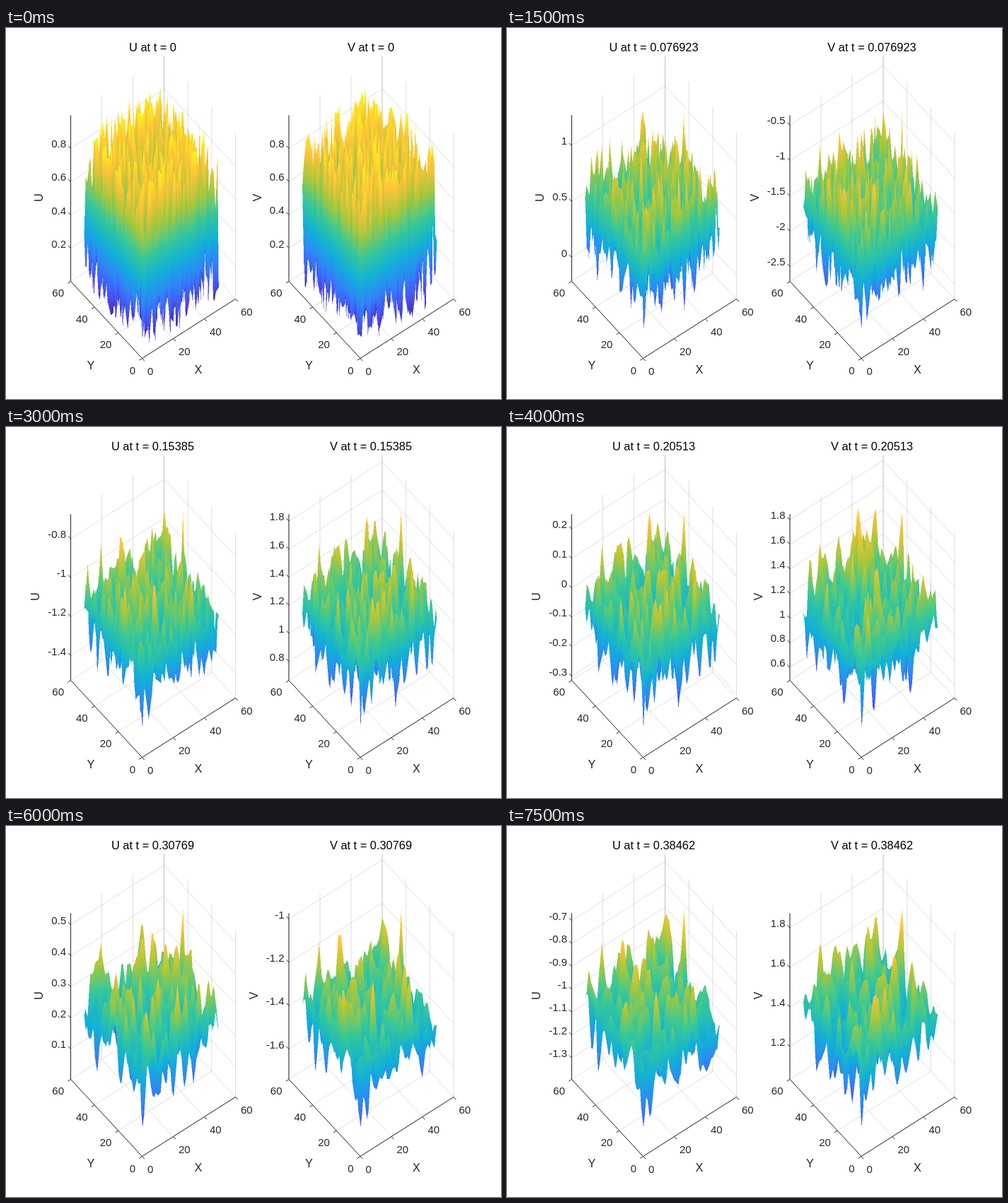
Animation, 700 px wide and 525 px high, one loop 8 s. Source, as an HTML page with a canvas:

```html
<!DOCTYPE html>
<html lang="en">
<head>
<meta charset="utf-8">
<title>Evolving U and V surfaces</title>
<style>
  html, body { margin: 0; width: 100%; height: 100%; overflow: hidden; background: #fff; }
  svg, canvas { position: absolute; left: 0; top: 0; width: 700px; height: 525px; }
  text { font-family: "Liberation Sans", Arial, sans-serif; font-size: 15px; fill: #262626; }
  .label { font-size: 16.3px; text-anchor: middle; }
  .title { font-size: 16.4px; text-anchor: middle; fill: #000; }
  .end { text-anchor: end; }
  path { fill: none; stroke: #262626; stroke-width: 1; }
  .grid { stroke-opacity: .15; }
</style>
</head>
<body>
<svg id="axes" viewBox="0 0 700 525"></svg>
<canvas id="surface" width="1400" height="1050"></canvas>
<script>
const N = 50, STEPS = 16, HOLD = 500, SCALE = 2, HEIGHT = 235, GAP = 308.5;

// Both means swing with one period; key points hold [step, drift, span]
const PERIOD = 8.7;
const PANELS = [
  { name: "U", swing: 1.1, peak: 10.17, keys: [
    [0, -.036, .998], [3, .0345, 1.487], [5, .003, .996], [8, -.036, .564],
    [10, -.001, .815], [13, -.002, .395], [15, .004, .726]] },
  { name: "V", swing: 1.6, peak: 6.87, keys: [
    [0, .105, .998], [3, -.03, 2.35], [5, -.093, 1.1], [8, .074, 1.35],
    [10, .063, .8], [13, -.037, .75], [15, -.012, .84]] }
];

// Lasting peaks and dips: x, y, relative height
const LANDMARKS = [[50, 31, .95], [11, 49, .84], [36, 38, .8], [1, 1, .16], [1, 39, .2]];

const COLOURS = ["3e26a8", "4852f4", "2e87f7", "12b1d6", "37c897", "abc739", "fec338", "f9fb15"]
  .map(h => [0, 2, 4].map(i => parseInt(h.slice(i, i + 2), 16)));

const mix = (a, b, t) => a + (b - a) * t;
const clamp = v => Math.max(0, Math.min(1, v));

const palette = Uint32Array.from({ length: 256 }, (_, n) => {
  const v = n / 255 * (COLOURS.length - 1), i = Math.min(COLOURS.length - 2, Math.floor(v));
  const [r, g, b] = [0, 1, 2].map(j => Math.round(mix(COLOURS[i][j], COLOURS[i + 1][j], v - i)));
  return (255 << 24 | b << 16 | g << 8 | r) >>> 0;
});

function limits({ swing, peak, keys }, k) {
  const i = Math.max(1, keys.findIndex(key => key[0] >= k));
  const a = keys[i - 1], b = keys[i], t = (k - a[0]) / (b[0] - a[0]);
  const mid = swing * Math.cos(2 * Math.PI * (k - peak) / PERIOD) + mix(a[1], b[1], t);
  const half = mix(a[2], b[2], t) / 2;
  return [mid - half, mid + half];
}

function random(seed) {
  return () => {
    seed = seed + 0x6D2B79F5 | 0;
    let t = Math.imul(seed ^ seed >>> 15, 1 | seed);
    t = t + Math.imul(t ^ t >>> 7, 61 | t) ^ t;
    return ((t ^ t >>> 14) >>> 0) / 4294967296;
  };
}

function diffuse(f) {
  const wrap = v => (v + N) % N;
  const at = (x, y) => f[wrap(y) * N + wrap(x)];
  return f.map((v, i) => {
    const x = i % N, y = (i - x) / N;
    return v + .06 * (at(x - 1, y) + at(x + 1, y) + at(x, y - 1) + at(x, y + 1) - 4 * v);
  });
}

// Scale noise to relative heights, then pull it toward the landmarks
function shape(f, k) {
  const mean = f.reduce((s, v) => s + v, 0) / f.length;
  const dev = Math.sqrt(f.reduce((s, v) => s + (v - mean) ** 2, 0) / f.length);
  const spread = .125 + .165 * Math.exp(-.6 * k), width = .25 * k + .01;
  return f.map((v, i) => {
    const x = i % N + 1, y = Math.floor(i / N) + 1;
    let z = .5 + (v - mean) / dev * spread;
    for (const [px, py, pz] of LANDMARKS)
      z = mix(z, pz, Math.exp(-((x - px) ** 2 + (y - py) ** 2) / width));
    return clamp(z);
  });
}

function buildSteps() {
  const rnd = random(2024);
  let a = Float64Array.from({ length: N * N }, rnd);
  let b = Float64Array.from({ length: N * N }, rnd);
  return Array.from({ length: STEPS }, (_, k) => {
    if (k) [a, b] = [diffuse(a), diffuse(b)];
    const turn = 2 * Math.PI * k / PERIOD, c = Math.cos(turn), s = Math.sin(turn);
    return [
      shape(a.map((v, i) => c * v + s * b[i]), k),
      shape(a.map((v, i) => c * b[i] - s * v), k)
    ];
  });
}

const project = (x, y, z = 0) =>
  [192.5 + 2.2 * x - 1.683 * y, 467.5 - 1.4 * x - 1.817 * y - HEIGHT * z];

const canvas = document.getElementById("surface"), ctx = canvas.getContext("2d");
const image = ctx.createImageData(canvas.width, canvas.height);
const pixels = new Uint32Array(image.data.buffer);

// Fill a triangle column by column; vertices are [x, y, height]
function fill(p, q, r) {
  const [a, b, c] = [p, q, r].sort((m, n) => m[0] - n[0]);
  for (let x = Math.ceil(a[0] - .5); x + .5 < c[0]; x++) {
    const X = x + .5, t = (X - a[0]) / (c[0] - a[0]);
    const [m, n] = X < b[0] ? [a, b] : [b, c];
    const u = (X - m[0]) / (n[0] - m[0] || 1);
    let y0 = mix(a[1], c[1], t), z0 = mix(a[2], c[2], t);
    let y1 = mix(m[1], n[1], u), z1 = mix(m[2], n[2], u);
    if (y0 > y1) [y0, z0, y1, z1] = [y1, z1, y0, z0];
    const slope = (z1 - z0) / (y1 - y0 || 1);
    for (let y = Math.ceil(y0 - .5); y + .5 < y1; y++)
      pixels[y * canvas.width + x] = palette[clamp(z0 + (y + .5 - y0) * slope) * 255 | 0];
  }
}

function drawSurface(field, shift) {
  const pts = Array.from(field, (z, i) => {
    const [x, y] = project(i % N + 1, Math.floor(i / N) + 1, z);
    return [(x + shift) * SCALE, y * SCALE, z];
  });
  for (let y = N - 2; y >= 0; y--)
    for (let x = N - 2; x >= 0; x--) {
      const i = y * N + x;
      fill(pts[i + 1], pts[i + N + 1], pts[i + N]);
      fill(pts[i], pts[i + 1], pts[i + N]);
    }
}

// Finest step that gives at most seven ticks
function zTicks(lo, hi) {
  for (const step of [.05, .1, .2, .5, 1]) {
    const first = Math.ceil(lo / step), count = Math.floor(hi / step) - first + 1;
    if (count <= 7)
      return Array.from({ length: count }, (_, i) => +((first + i) * step).toFixed(2));
  }
}

const line = (...points) => "M" + points.map(p => p.join(" ")).join("L");
const tick = ([x, y], dx, dy) => `M${x} ${y}l${dx} ${dy}`;
const text = (x, y, s, cls = "", extra = "") => `<text x="${x}" y="${y}" class="${cls}" ${extra}>${s}</text>`;

function axesMarkup(panel, k, shift) {
  const [lo, hi] = limits(panel, k);
  let grid = "", labels = "";
  let axis = line(project(0, 60, 1), project(0, 60), project(0, 0), project(60, 0));
  for (const v of [0, 20, 40, 60]) {
    grid += line(project(v, 0), project(v, 60), project(v, 60, 1));
    grid += line(project(0, v), project(60, v), project(60, v, 1));
    const px = project(v, 0), py = project(0, v);
    axis += tick(px, 3.4, 3.7) + tick(py, -4.2, 2.7);
    labels += text(px[0] + 7.5, px[1] + 23.5, v) + text(py[0] - 9.5, py[1] + 22, v, "end");
  }
  const ticks = zTicks(lo, hi);
  for (const v of ticks) {
    const z = (v - lo) / (hi - lo), p = project(0, 60, z);
    grid += line(p, project(60, 60, z), project(60, 0, z));
    axis += tick(p, -3.4, -3.7);
    labels += text(85, p[1] - 1, v, "end");
  }
  const labelX = ticks.some(v => v < 0 && v % 1) && hi - lo < 1.2 || hi < 0 ? 47 : 52;
  labels += text(272, 489, "X", "label") + text(120, 483, "Y", "label")
    + text(0, 0, panel.name, "label", `transform="translate(${labelX} 240) rotate(-90)"`)
    + text(207.5, 33, `${panel.name} at t = ${+(k / 39).toPrecision(5)}`, "title");
  return `<g transform="translate(${shift})"><path class="grid" d="${grid}"/>`
    + `<path d="${axis}"/>${labels}</g>`;
}

const steps = buildSteps(), axes = document.getElementById("axes");

function render(k) {
  axes.innerHTML = PANELS.map((panel, i) => axesMarkup(panel, k, i * GAP)).join("");
  pixels.fill(0);
  steps[k].forEach((field, i) => drawSurface(field, i * GAP));
  ctx.putImageData(image, 0, 0);
}

let shown = 0;
const start = performance.now();
render(0);

function loop() {
  const k = Math.floor((performance.now() - start) / HOLD) % STEPS;
  if (k !== shown) render(shown = k);
  requestAnimationFrame(loop);
}
requestAnimationFrame(loop);
</script>
</body>
</html>
```
